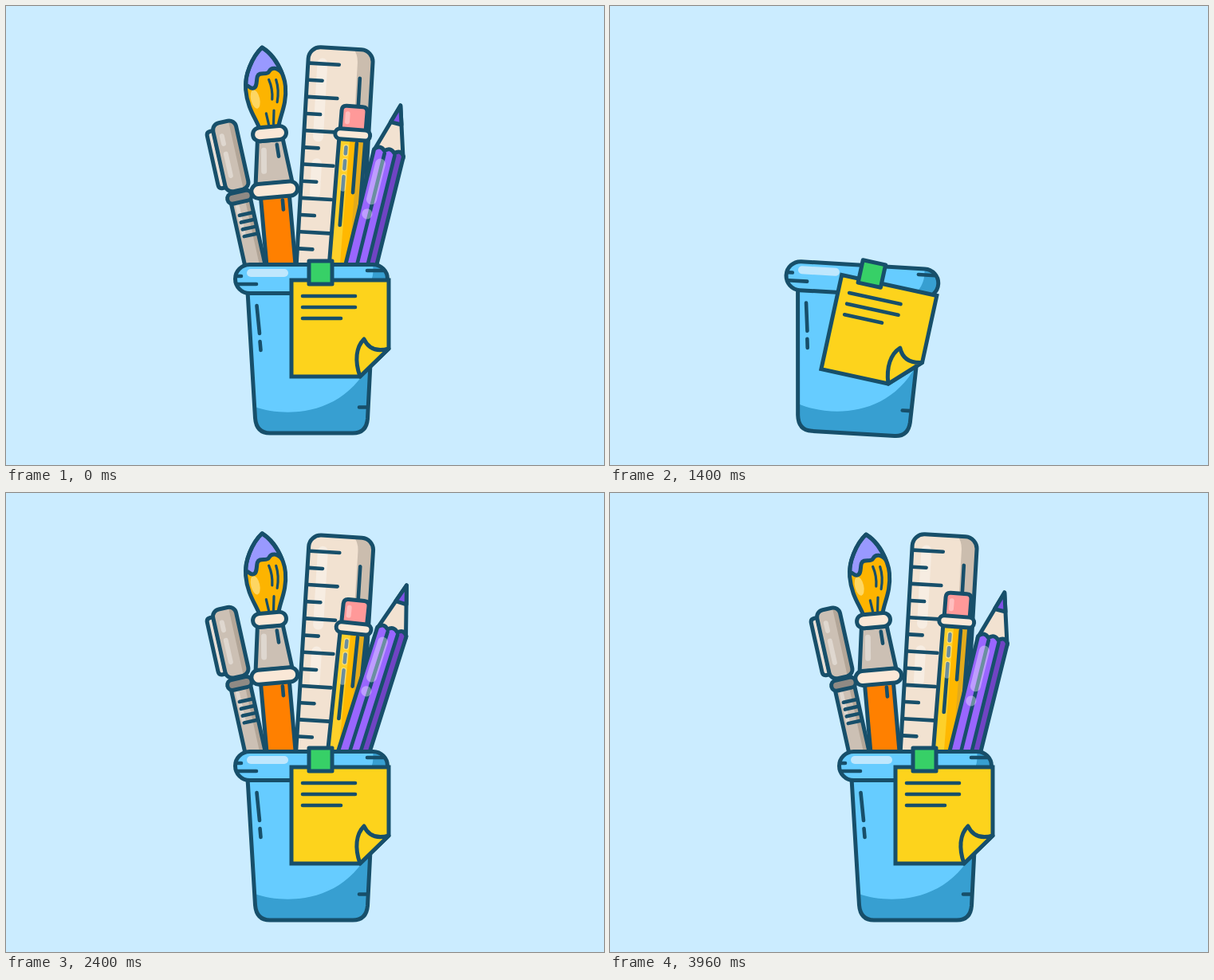
Recreate the animation shown at these times as an HTML page. Size 750x576 px, loop 4 s.

```html
<!DOCTYPE html>
<html lang="en">
<head>
<meta charset="utf-8">
<title>Pencil cup</title>
<style>
  html, body { margin: 0; width: 100%; height: 100%; overflow: hidden; background: #cbecff; }
  svg { display: block; width: 100vw; height: 100vh; }
  .o { stroke: #174f6a; stroke-width: 5; stroke-linejoin: round; stroke-linecap: round; }
  .l { fill: none; stroke: #174f6a; stroke-width: 4.6; stroke-linecap: round; stroke-linejoin: round; }
  .thin { stroke-width: 3.2; }
  .shine { fill: none; stroke: #fff; stroke-opacity: .36; stroke-linecap: round; }
  .none { fill: none; }
</style>
</head>
<body>
<svg viewBox="0 0 750 576">
  <g id="all">
    <g id="ruler"><g transform="translate(380 51) rotate(3.3)">
      <rect width="81" height="350" rx="15" fill="#f2e2d1"/>
      <path d="M56 0H66Q81 0 81 15V335Q81 350 66 350H62V18Q62 6 56 0Z" fill="#cbbdae"/>
      <path class="shine" stroke-width="13" d="M18 20V112M18 146V184"/>
      <path id="ticks" class="l"/>
      <path class="l" d="M66 36V132"/>
      <rect class="o none" width="81" height="350" rx="15"/>
    </g></g>

    <g id="pen"><g transform="translate(272 145.500) rotate(-12.5)">
      <path d="M-12 100H13V240L4 258H-3L-12 240Z" fill="#ccc0b4"/>
      <path d="M6 100H13V240L6 254Z" fill="#b3a698"/>
      <path class="shine" stroke-width="5" d="M-5 108V146"/>
      <path class="l" d="M-5 119H11M-5 128H11M-5 137H11M-5 146H11"/>
      <path class="o none" d="M-12 100H13V240L4 258H-3L-12 240Z"/>
      <rect class="o" x="-15.500" y="90" width="31" height="13" rx="6.500" fill="#8f8a84"/>
      <path class="o" d="M-14 8H-18Q-23 8 -23 13V76Q-23 81 -18 81H-14Z" fill="#e6ded6"/>
      <rect x="-14.500" width="29.500" height="88" rx="9" fill="#ccc0b4"/>
      <path d="M7 1Q15 2 15 10V78Q15 86 7 87Z" fill="#b3a698"/>
      <path class="shine" stroke-width="6" d="M-5 17V27M-5 40V68"/>
      <rect class="o none" x="-14.500" width="29.500" height="88" rx="9"/>
    </g></g>

    <g id="brush"><g transform="translate(321 51) rotate(-5)">
      <path class="o" d="M-18 188H18V340Q0 352 -18 340Z" fill="#ff8000"/>
      <path class="l" d="M9 194V206"/>
      <path class="o" d="M-16 118H16L23 172H-23Z" fill="#ccc0b4"/>
      <path class="shine" stroke-width="7" d="M-9 130L-11 156"/>
      <path class="l" d="M8 124L9 139"/>
      <rect class="o" x="-29" y="171.500" width="58" height="18" rx="9" fill="#fae8d7"/>
      <path d="M0 1C14 12 25 35 25 52C25 75 15 88 12 102H-12C-16 88 -25 75 -25 52C-25 35 -14 12 0 1Z" fill="#fdb400"/>
      <ellipse cx="-14" cy="65" rx="5.5" ry="12" fill="#fed662" transform="rotate(-8 -14 65)"/>
      <path class="l thin" d="M5 42Q9 54 7 67M14 43Q17 56 13 71M-2 84L0 98M8 81L6 98"/>
      <path class="o" d="M0 1C11 9 18 21 22 35C17 28 10 26 6 32C3 37 -6 30 -9 37C-11 42 -10 51 -16 51C-20 51 -20 47 -24 47C-25 35 -14 12 0 1Z" fill="#9999ff"/>
      <path class="o none" d="M0 1C14 12 25 35 25 52C25 75 15 88 12 102H-12C-16 88 -25 75 -25 52C-25 35 -14 12 0 1Z"/>
      <rect class="o" x="-21" y="101" width="42" height="17" rx="8.5" fill="#fae8d7"/>
    </g></g>

    <g id="pencil"><g transform="translate(437.5 126) rotate(4.5)">
      <path class="o" d="M-16.500 239H16.500L0 300Z" fill="#e0caa8"/>
      <path class="o" d="M-8 271H8L0 300Z" fill="#7d8287"/>
      <path d="M-16.500 40H16.500V239H-16.500Z" fill="#ffb800"/>
      <path d="M-16.500 40H-3V239H-16.500Z" fill="#fdd02a"/>
      <path d="M8 40H16.500V239H8Z" fill="#e3ab1c"/>
      <path class="l" d="M-7 52V60M-7 69V79M-7 89V150M6 46V108"/>
      <path d="M-7 52V60M-7 69V79M-7 89V104" class="shine" stroke-width="7"/>
      <path class="o none" d="M-16.500 40H16.500V239H-16.500Z"/>
      <path class="o" d="M-16 32V6Q-16 0 -10 0H10Q16 0 16 6V32Z" fill="#ff9999"/>
      <path class="shine" stroke-width="6" d="M-8 10V20"/>
      <rect class="o" x="-22" y="29" width="44" height="13" rx="6.5" fill="#fae8d7"/>
    </g></g>

    <g id="crayon"><g transform="translate(495 124) rotate(13.9)">
      <path class="o" d="M0 1L19 64H-19Z" fill="#f2e2d1"/>
      <path class="o" d="M0 1L7 24H-7Z" fill="#7f50e6"/>
      <path d="M-19 62Q-13 54 -6 61Q0 54 7 61Q13 54 19 62V315H-19Z" fill="#9966ff"/>
      <path d="M8 60Q14 55 19 62V315H8Z" fill="#7044c4"/>
      <path class="l" d="M-5 64V315M8 64V315"/>
      <path class="shine" stroke-width="13" d="M-7 78V124M-8 143V143.1"/>
      <path class="o none" d="M-19 62Q-13 54 -6 61Q0 54 7 61Q13 54 19 62V315H-19Z"/>
    </g></g>

    <g id="cup">
      <path d="M302.500 350L312.500 517Q314 536 331 536H435Q452 536 453.500 518L462 350Z" fill="#66ccff"/>
      <path d="M312 503C352 517 425 514 457 446L453.500 518Q452 536 435 536H331Q314 536 312.500 517Z" fill="#379fd1"/>
      <path class="o none" d="M302.500 350L312.500 517Q314 536 331 536H435Q452 536 453.500 518L462 350"/>
      <path class="l" d="M314.500 376L318 411M318.500 421L319.500 432M443 503.500H453"/>
      <rect x="287.500" y="324.500" width="191" height="36" rx="18" fill="#66ccff"/>
      <path d="M460 324.500C463 345 452 358 440 360.500H460.500A18 18 0 0 0 460.500 324.500Z" fill="#379fd1"/>
      <rect x="302" y="330" width="52" height="10" rx="5" fill="#bfe7fd"/>
      <path class="l" d="M290 339H295M290 349H314M453 332H474"/>
      <rect class="o none" x="287.500" y="324.500" width="191" height="36" rx="18"/>
    </g>

    <g id="note">
      <path class="o" style="stroke-linejoin:miter" d="M358 344H480V430L444 465H358Z" fill="#fdd31c"/>
      <path class="o" d="M444 465C437 445 439 428 449 418C455 431 466 434 480 430Z" fill="#fdd31c"/>
      <path class="l" d="M372 364H438M372 378H438M372 392H420"/>
      <rect class="o" x="380" y="320" width="29" height="29" fill="#37d067"/>
    </g>
  </g>
</svg>
<script>
  const LOOP = 4000, STEP = 40;
  const el = id => document.getElementById(id);

  // alternating long and short ruler marks
  el('ticks').setAttribute('d', Array.from({ length: 15 }, (_, i) =>
    `M2 ${(20.5 + i * 21.2).toFixed(1)}h${i % 2 ? 17 : 37}`).join(''));

  // smooth curve through [time, value] points, flat at every peak
  function track(keys, t) {
    const last = keys.length - 1;
    if (t <= keys[0][0]) return keys[0][1];
    if (t >= keys[last][0]) return keys[last][1];
    const slope = i => (keys[i + 1][1] - keys[i][1]) / (keys[i + 1][0] - keys[i][0]);
    const tangent = i => {
      if (i === 0) return slope(0);
      if (i === last) return 0;
      const a = slope(i - 1), b = slope(i);
      return a * b <= 0 ? 0 : 2 * a * b / (a + b);
    };
    let i = 0;
    while (t >= keys[i + 1][0]) i++;
    const [t0, v0] = keys[i], [t1, v1] = keys[i + 1];
    const h = t1 - t0, u = (t - t0) / h, w = 1 - u;
    return v0 * w * w * (1 + 2 * u) + v1 * u * u * (3 - 2 * u)
      + h * u * w * (tangent(i) * w - tangent(i + 1) * u);
  }

  const enter = {
    x: [[1080, -530], [1120, -450], [1400, -78.2], [1560, 40], [1640, 31], [1840, 12], [2120, 1], [2280, 0]],
    y: [[1120, -4], [1400, 0.3], [1520, 0]],
    turn: [[1080, 11], [1120, 10.3], [1400, 3.4], [1560, -2.5], [1720, 1], [1880, 0]],
    note: [[1120, 24.7], [1400, 8.9], [1560, -8], [1720, 3], [1880, -1], [2000, 0]]
  };
  const drop = {
    y: [[0, -560], [120, -329], [240, -66], [300, 2], [360, 10], [480, 2.5], [680, -1.5], [840, 0]],
    turn: [[0, 12], [120, 8.4], [240, 4.7], [360, 2], [480, .5], [600, 0]]
  };
  // start time and pivot of each falling tool
  const tools = [
    ['pen', 1640, 295, 235],
    ['brush', 1760, 337, 235],
    ['ruler', 1880, 410, 190],
    ['pencil', 2000, 429, 217],
    ['crayon', 2120, 468, 245]
  ];

  const place = (id, x, y, turn, cx, cy) => el(id).setAttribute('transform',
    `translate(${x.toFixed(2)} ${y.toFixed(2)}) rotate(${turn.toFixed(2)} ${cx} ${cy})`);

  function draw(t) {
    const leaving = t < 360;
    el('all').style.display = leaving || t >= 1120 ? '' : 'none';
    if (leaving) {
      const k = t / 200;
      place('all', 314.5 * k ** 1.1, -2 * k, -6.5 * (1 - Math.exp(-t / 125)), 381, 538);
      place('note', 0, 0, 0, 394.5, 334.5);
    } else {
      place('all', track(enter.x, t), track(enter.y, t), track(enter.turn, t), 381, 538);
      place('note', 0, 0, track(enter.note, t), 394.5, 334.5);
    }
    for (const [id, start, cx, cy] of tools) {
      const age = leaving ? LOOP : t - start;
      place(id, 0, track(drop.y, age), track(drop.turn, age), cx, cy);
    }
  }

  const begin = performance.now();
  function tick() {
    const t = (performance.now() - begin) % LOOP;
    draw(Math.floor(t / STEP) * STEP);
    requestAnimationFrame(tick);
  }
  draw(0);
  requestAnimationFrame(tick);
</script>
</body>
</html>
```
